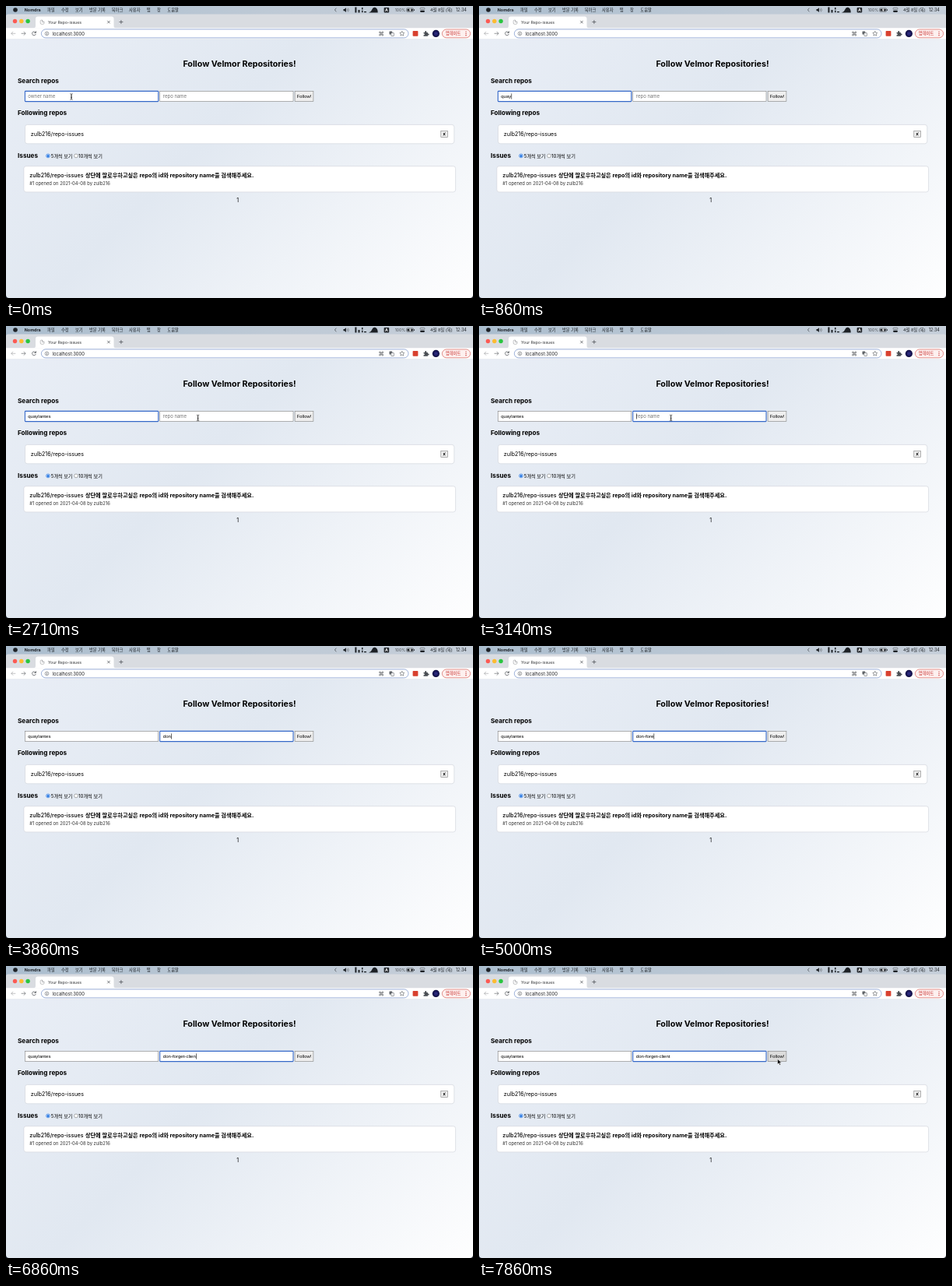
Write an HTML page that moves like this. It is 600 by 375 pixels and loops after 8 s.

```html
<!DOCTYPE html>
<html lang="ko">
<head>
<meta charset="utf-8">
<title>Repo-issues</title>
<style>
  html, body { margin: 0; width: 100%; height: 100%; overflow: hidden; background: #fff; }
  svg { display: block; width: 100%; height: 100%; }
  text { font-family: Inter, "Noto Sans CJK KR", "Noto Sans CJK", sans-serif; fill: #000; white-space: pre; }
  .b { font-weight: 700; }
  .m { font-weight: 500; }
  .bar { font-size: 5.3px; fill: #1c2025; }
  .field { font-family: "Liberation Sans", Arial, sans-serif; font-size: 6.05px; }
  .hint { font-size: 6px; fill: #757575; }
  .line { fill: none; stroke: #4b4f54; stroke-width: .75; }
  .thin { stroke-width: .55; }
</style>
</head>
<body>
<svg id="stage" viewBox="0 0 600 375" preserveAspectRatio="none">
  <defs>
    <linearGradient id="page" gradientUnits="userSpaceOnUse" x1="56" y1="-35" x2="544" y2="453">
      <stop offset="0" stop-color="#e9eef6"/>
      <stop offset=".42" stop-color="#e1e8f1"/>
      <stop offset="1" stop-color="#fff"/>
    </linearGradient>
    <linearGradient id="menu">
      <stop offset="0" stop-color="#aabdce"/>
      <stop offset=".6" stop-color="#bfcad6"/>
      <stop offset="1" stop-color="#c5ced9"/>
    </linearGradient>
    <radialGradient id="face">
      <stop offset="0" stop-color="#33308c"/>
      <stop offset="1" stop-color="#0c0a3c"/>
    </radialGradient>
  </defs>
  <rect width="600" height="375" fill="url(#page)"/>

  <g id="menubar">
    <rect width="600" height="12" fill="url(#menu)"/>
    <circle cx="12" cy="5" r="2.8" fill="#1c2025"/>
    <path d="M424.3 2.7L422.4 5L424.3 7.3" class="line"/>
    <path d="M433.5 4h1.4l2-1.7v5.6l-2-1.7h-1.4z" fill="#1c2025"/>
    <path d="M438 3.6q1.2 1.5 0 3M439.4 2.7q2 2.4 0 4.8" class="line thin"/>
    <path d="M448.4 1.5h2v7h-2zM452.5 5h2v3.5h-2zM457 2h1.5v2.5h-1.5zM457 5.8h1.5v2.5h-1.5zM460 7h3v1.2h-3z" fill="#1c2025"/>
    <path d="M466 8.5q3-.5 4-3.5q1.4-3.6 4-3.2q3.6.6 3.7 6.7z" fill="#1c2025"/>
    <rect x="485.6" y="2" width="6.6" height="6.4" rx="1" fill="#23272c"/>
    <rect x="514.6" y="2.8" width="9" height="4.6" rx="1.1" class="line thin"/>
    <path d="M515.5 3.7h7.2v2.8h-7.2zM524.2 4.2h.8v1.8h-.8z" fill="#1c2025"/>
    <path d="M519.7 2.4l-2 3h1.5l-.5 2.4l2.2-3.2h-1.5z" fill="#fff"/>
    <rect x="532" y="2.3" width="6" height="2.3" rx="1.15" class="line thin"/>
    <rect x="532" y="5.7" width="6" height="2.3" rx="1.15" fill="#1c2025"/>
  </g>

  <g id="tabs">
    <path d="M0 28.5v-15q0-3 3-3h594q3 0 3 3v15z" fill="#d9dce1"/>
    <circle cx="11.5" cy="19.5" r="2.7" fill="#fc5b54"/>
    <circle cx="19.8" cy="19.5" r="2.7" fill="#fdbb2f"/>
    <circle cx="28.1" cy="19.5" r="2.7" fill="#2ac640"/>
    <path d="M35 28.5q3 0 3-3v-9q0-3 3-3h94.5q3 0 3 3v9q0 3 3 3z" fill="#fff"/>
    <path d="M46.5 18.1h-1q-1.3 0-1.3 1.3v2.6q0 1.3 1.3 1.3h2.2q1.3 0 1.3-1.3v-1.4zM46.5 18.1v2.5h2.5" class="line thin" opacity=".6"/>
    <path d="M130.2 18.9l3.4 3.4m0-3.4l-3.4 3.4M145.4 20.5h5m-2.5-2.5v5" class="line"/>
  </g>

  <g id="toolbar">
    <rect y="28.3" width="600" height="14.2" fill="#fff"/>
    <path d="M0 42.7h600" stroke="#d9dde3" stroke-width=".4"/>
    <path d="M12.3 35.3h-5.5m2.4-2.4l-2.4 2.4l2.4 2.4" class="line" opacity=".45"/>
    <path d="M19.6 35.3h5.5m-2.4-2.4l2.4 2.4l-2.4 2.4" class="line" opacity=".75"/>
    <path d="M38 34a2.4 2.4 0 1 0 .3 2M38.5 32.3v2.2h-2.2" class="line"/>
    <rect x="45.4" y="29.9" width="471.6" height="11" rx="5.5" fill="#fff" stroke="#809bcf" stroke-width=".8"/>
    <circle cx="52.5" cy="35.4" r="2.3" class="line thin"/>
    <path d="M52.5 35v1.7m0-2.8v.6" class="line"/>
    <path d="M479.7 33h1.6v1.6h-1.6zM483 33h1.6v1.6h-1.6zM479.7 36.4h1.6v1.6h-1.6zM483 36.4h1.6v1.6h-1.6zM481.3 34.6h1.7v1.8h-1.7z" class="line thin"/>
    <rect x="492.5" y="32.4" width="3.8" height="4.2" rx=".5" fill="#5f6368"/>
    <rect x="494.8" y="34.5" width="3.6" height="4" rx=".5" fill="#fff" stroke="#5f6368" stroke-width=".6"/>
    <path d="M508.8 32.3l.9 2l2.1.2l-1.6 1.5l.5 2.1l-1.9-1.1l-1.9 1.1l.5-2.1l-1.6-1.5l2.1-.2z" class="line thin"/>
    <rect x="522.6" y="32" width="6.8" height="6.8" rx=".8" fill="#d8402f"/>
    <path d="M536.5 34h1.6q-.5-1.9 1.1-1.9t1.1 1.9h1.6v1.5q1.8-.3 1.8 1t-1.8 1v1.2h-5.4v-1.5q1.4-.2 1.4-1t-1.4-.9z" fill="#4b4f54"/>
    <circle cx="552.4" cy="35.4" r="4.6" fill="url(#face)"/>
    <rect x="560.4" y="30" width="36.2" height="10.8" rx="5.4" fill="#fdf0ef" stroke="#d9655d" stroke-width=".7"/>
    <path d="M591 32.7v1.1m0 1.1v1.1m0 1.1v1.1" stroke="#c5221f" stroke-width="1.1"/>
  </g>

  <g id="panels" fill="#fff" stroke="#cdd1d8" stroke-width=".6">
    <rect x="24.5" y="152.4" width="551.3" height="24.4" rx="3"/>
    <rect x="22.9" y="205.7" width="554.7" height="33.2" rx="3"/>
    <rect x="558.8" y="160.3" width="8.7" height="8.3" fill="#efefef" stroke="#808080"/>
    <path d="M561.9 166.3q1.2-2.2 2.6-3.7M562 163q1.1 1.9 2.4 3.2" fill="none" stroke="#000" stroke-width=".9"/>
    <circle cx="54" cy="192.4" r="2.4" stroke="#1a6fe0" stroke-width=".7"/>
    <circle cx="54" cy="192.4" r="1.5" fill="#1a6fe0" stroke="none"/>
    <circle cx="90" cy="192.4" r="2.4" stroke="#767676"/>
  </g>

  <g id="form">
    <rect id="ownerBox" x="24.4" y="109.4" width="171.3" height="13.2"/>
    <rect id="repoBox" x="197.7" y="109.4" width="171.3" height="13.2"/>
    <rect id="button" x="371.1" y="109.4" width="23.8" height="13.2" stroke="#808080" stroke-width=".6"/>
    <text id="owner" x="28.2" y="118.1"/>
    <text id="repo" x="201.8" y="118.1"/>
    <rect id="caret" y="112.4" width=".6" height="7.2"/>
  </g>
  <g id="labels"></g>

  <g id="beam" fill="none">
    <path d="M-1.6-3.8q1.6 0 1.6 1v5.6q0 1-1.6 1M1.6-3.8q-1.6 0-1.6 1v5.6q0 1 1.6 1M-.9.9h1.8" stroke="#222" stroke-width=".65"/>
  </g>
  <path id="arrow" d="M0 0v6.9l1.6-1.5l1.1 2.5l1.2-.5l-1.1-2.5h2.2z" fill="#000" stroke="#fff" stroke-width=".5"/>
  <path id="corners" d="M0 371v4h4q-4 0-4-4zM600 371v4h-4q4 0 4-4z" fill="#141a26"/>
</svg>
<script>
const $ = id => document.getElementById(id);
const LOOP = 8000, FPS = 7;

function label(x, y, size, str, cls = '', fill, anchor) {
  const el = document.createElementNS('http://www.w3.org/2000/svg', 'text');
  el.setAttribute('x', x);
  el.setAttribute('y', y);
  el.setAttribute('class', cls);
  el.style.fontSize = size + 'px';
  if (fill) el.style.fill = fill;
  if (anchor) el.setAttribute('text-anchor', anchor);
  el.textContent = str;
  $('labels').append(el);
}

// Menu bar
label(23.8, 7.1, 5.35, 'Nomdra', 'bar b');
[[53, '파일'], [71, '수정'], [89, '보기'], [107, '방문 기록'], [135.7, '북마크'],
 [158, '사용자'], [180.7, '탭'], [194, '창'], [207.3, '도움말']]
  .forEach(([x, s]) => label(x, 7.1, 5.3, s, 'bar'));
label(488.9, 7, 5, 'A', 'b', '#fff', 'middle');
label(499.8, 7, 5, '100%', 'bar', '#43484e');
label(545, 7.1, 5.4, '4월 8일 (목)', 'bar');
label(577.8, 7.1, 5.5, '12:34', 'bar');

// Browser
label(54, 22.5, 5.15, 'Your Repo-issues', '', '#303236');
label(59.6, 37.6, 5.85, 'localhost:3000', '', '#202124');
label(564.8, 37.3, 5.3, '업데이트', '', '#c5221f');

// Page
const user = 'zulb216', repoPath = user + '/repo-issues';
label(300, 78.3, 10.7, 'Follow Velmor Repositories!', 'b', '', 'middle');
label(15, 98.7, 8.2, 'Search repos', 'b');
label(15, 139.7, 8.2, 'Following repos', 'b');
label(15, 195.2, 8.2, 'Issues', 'b');
label(31.8, 167.1, 7.1, repoPath);
label(57.8, 194.6, 6.05, '5개씩 보기');
label(93, 194.6, 6.2, '10개씩 보기');
label(30.3, 220.2, 7.1, repoPath, 'm');
label(101.9, 220.2, 7.2, '상단에 팔로우하고싶은 repo의 id와 repository name을 검색해주세요.', 'b');
label(30.3, 230, 5.85, '#1 opened on 2021-04-08 by ' + user, '', '#333');
label(297.6, 252, 7, '1', '', '', 'middle');
label(383, 118, 5.85, 'Follow!', 'field', '', 'middle');

// Keystrokes with the tick each one lands on; "<" deletes one character
const ownerKeys = { str: 'quaylantes', at: [2, 3, 5, 6, 8, 9, 10, 11, 12, 13] };
const repoKeys = {
  str: 'don-fore<get-client',
  at: [24, 26, 27, 29, 31, 32, 33, 35, 37, 38, 39, 40, 42, 43, 45, 46, 47, 48, 49]
};
const SWITCH = 21, PRESS = 54;

function typed({ str, at }, tick) {
  let out = '', last = -1;
  at.forEach((k, i) => {
    if (k > tick) return;
    out = str[i] === '<' ? out.slice(0, -1) : out + str[i];
    last = k;
  });
  return { out, last };
}

function ease(tick, from, to) {
  const u = Math.min(1, Math.max(0, (tick - from) / (to - from)));
  return u * u * (3 - 2 * u);
}

function pointer(tick) {
  if (tick < 2) return [84, 116.5];
  if (tick >= 15 && tick < 24) {
    const u = ease(tick, 14, 19);
    return [84 + 162.6 * u, 116.5 + 1.5 * u];
  }
  if (tick >= 50) {
    const u = ease(tick, 49, 54);
    return [246.6 + 137 * u, 118 + 1.4 * u];
  }
  return null;
}

function setField(id, text, hint) {
  $(id).textContent = text || hint;
  $(id).setAttribute('class', text ? 'field' : 'hint');
}

function setBox(id, focused) {
  const box = $(id);
  box.setAttribute('fill', '#fff');
  box.setAttribute('stroke', focused ? '#3568c8' : '#808080');
  box.setAttribute('stroke-width', focused ? 1.1 : .6);
  box.setAttribute('rx', focused ? .6 : 0);
}

function place(id, pos, visible) {
  $(id).style.display = visible ? '' : 'none';
  if (visible) $(id).setAttribute('transform', `translate(${pos})`);
}

function render(ms) {
  const tick = Math.floor(ms * FPS / 1000 + .1);
  const owner = typed(ownerKeys, tick), repo = typed(repoKeys, tick);
  const onRepo = tick >= SWITCH;

  setField('owner', owner.out, 'owner name');
  setField('repo', repo.out, 'repo name');
  setBox('ownerBox', !onRepo);
  setBox('repoBox', onRepo);
  $('button').setAttribute('fill', tick >= PRESS ? '#dcdcdc' : '#efefef');

  // The caret blinks every half second after the last key
  const state = onRepo ? repo : owner;
  const since = state.last < 0 ? (onRepo ? SWITCH : -4) : state.last;
  const lit = (tick - since) % FPS < FPS / 2;
  const field = $(onRepo ? 'repo' : 'owner');
  const width = state.out ? field.getComputedTextLength() : 0;
  $('caret').setAttribute('x', +field.getAttribute('x') + width + .2);
  $('caret').style.display = lit ? '' : 'none';

  const pos = pointer(tick);
  const isArrow = pos && pos[0] > 369;
  place('beam', pos, pos && !isArrow);
  place('arrow', pos, isArrow);
}

const start = performance.now();
function loop() {
  render((performance.now() - start) % LOOP);
  requestAnimationFrame(loop);
}
render(0);
requestAnimationFrame(loop);
</script>
</body>
</html>
```
